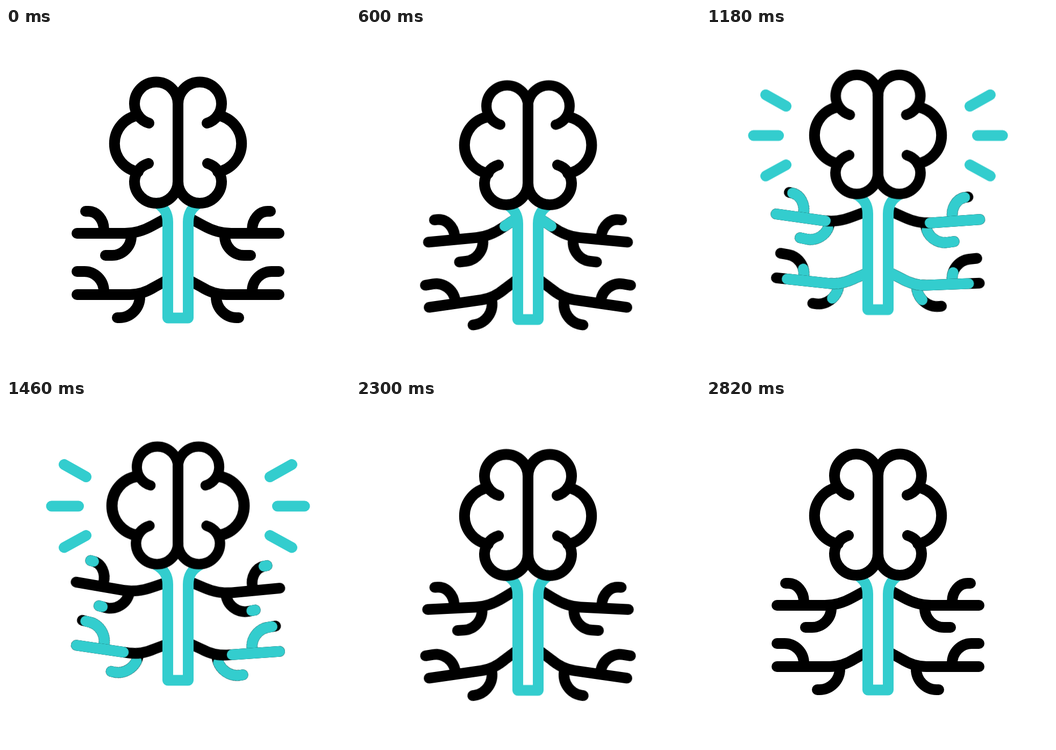
Write an HTML page without scripts that moves like this. It is 640x640 px and loops after 3.2 s.

```html
<!DOCTYPE html>
<html lang="en">
<head>
<meta charset="utf-8">
<title>Nervous system</title>
<style>
  html, body { margin: 0; width: 100%; height: 100%; overflow: hidden; background: #fff; }
  svg { display: block; width: 100%; height: 100%; --teal: #33cdce; }
  path { fill: none; stroke: #000; stroke-width: 20; stroke-linecap: round; stroke-linejoin: round; }
  g, path { animation: 3200ms linear infinite both; }
  .stem, .pulse, .ray { stroke: var(--teal); }
  .stem { stroke-linecap: butt; }

  .left { --lag: 0deg; }
  .right { --lag: 4.4deg; }

  .body { animation-name: bob; }
  .upper { animation-name: swing-upper; transform-origin: 278px 360px; }
  .lower { animation-name: swing-lower; transform-origin: 280px 478px; }
  .up, .down { animation-name: bend; }
  .upper .up { transform-origin: 182px 380px; }
  .upper .down { transform-origin: 233px 384px; }
  .lower .up { transform-origin: 182px 494px; }
  .lower .down { transform-origin: 249px 497px; }

  .upper .limb { d: path("M297 354.5 L272 368 Q247 382 221 382 H132"); }
  .upper .up path { d: path("M182 375 A29 34 0 0 0 153 341 H148"); }
  .upper .down path { d: path("M233 387 A36 36 0 0 1 197 423 H185"); }
  .lower .limb { d: path("M297 470.5 L276 482 Q254 496 230 496 H132"); }
  .lower .up path { d: path("M182 490 A36 37 0 0 0 146 453 H132"); }
  .lower .down path { d: path("M249 500 A38 39 0 0 1 211 539 H207"); }

  .limb.pulse { animation-name: pulse-limb; }
  .up .pulse { animation-name: pulse-up; }
  .down .pulse { animation-name: pulse-down; }
  .lower .pulse { animation-delay: 270ms; }
  .ray { animation-name: ray; }

  .lobe { animation-name: throb; animation-timing-function: ease-in-out; }
  .top { --size: .93; transform-origin: 320px 177px; }
  .side { --size: 1.042; transform-origin: 320px 215px; animation-delay: 150ms; }
  .base { --size: .93; transform-origin: 320px 252px; animation-delay: 260ms; }

  @keyframes bob {
    0%, 6.6% { transform: translateY(0); animation-timing-function: ease-in-out; }
    11.7% { transform: translateY(7px); animation-timing-function: ease-in; }
    28.75% { transform: translateY(-11px); animation-timing-function: ease-out; }
    33.1% { transform: translateY(-14.5px); animation-timing-function: cubic-bezier(.3, .3, .6, 1); }
    56.25% { transform: translateY(-19.5px); animation-timing-function: cubic-bezier(.5, 0, .7, 1); }
    69.4% { transform: translateY(7px); animation-timing-function: ease-out; }
    76.25% { transform: translateY(-5px); animation-timing-function: ease-in-out; }
    88.1%, 100% { transform: translateY(0); }
  }
  @keyframes swing-upper {
    0%, 6.6% { transform: rotate(0deg); animation-timing-function: ease-in-out; }
    12.5% { transform: rotate(-9deg); }
    18.75% { transform: rotate(-5.4deg); }
    28.75% { transform: rotate(calc(4.3deg - var(--lag) * .68)); animation-timing-function: ease-out; }
    45.6% { transform: rotate(calc(9.8deg - var(--lag))); }
    54% { transform: rotate(calc(9.8deg - var(--lag))); animation-timing-function: ease-in; }
    61.9% { transform: rotate(calc(8.2deg - var(--lag))); animation-timing-function: ease-in-out; }
    69.1% { transform: rotate(-8deg); }
    71.9% { transform: rotate(-2.8deg); animation-timing-function: ease-out; }
    76.25% { transform: rotate(4deg); animation-timing-function: ease-in-out; }
    88.1%, 100% { transform: rotate(0deg); }
  }
  @keyframes swing-lower {
    0%, 6.6% { transform: rotate(0deg); animation-timing-function: ease-in-out; }
    13.1% { transform: rotate(-17deg); animation-timing-function: ease-in-out; }
    18.75% { transform: rotate(-8.2deg); }
    28.75% { transform: rotate(calc(1.5deg - var(--lag) * .6)); animation-timing-function: ease-out; }
    45.6% { transform: rotate(calc(8.3deg - var(--lag))); }
    54% { transform: rotate(calc(9.8deg - var(--lag))); }
    61.9% { transform: rotate(calc(9.4deg - var(--lag))); animation-timing-function: ease-in-out; }
    69.7% { transform: rotate(-14deg); }
    71.9% { transform: rotate(-8.2deg); animation-timing-function: ease-out; }
    77.2% { transform: rotate(4deg); animation-timing-function: ease-in-out; }
    88.1%, 100% { transform: rotate(0deg); }
  }
  @keyframes bend {
    0%, 6.6% { transform: rotate(0deg); }
    13.1% { transform: rotate(-2.5deg); }
    18.75% { transform: rotate(-1.5deg); }
    28.75% { transform: rotate(2.5deg); }
    45.6%, 61.9% { transform: rotate(5.5deg); }
    71.9% { transform: rotate(-1deg); }
    76.5% { transform: rotate(1deg); }
    88.1%, 100% { transform: rotate(0deg); }
  }
  @keyframes throb {
    0%, 13.1%, 32.7%, 52.2%, 100% { transform: scale(1); }
    22.9%, 42.4% { transform: scale(var(--size)); }
  }

  /* Each pulse grows from the root, then its tail catches up at the tip. */
  @keyframes pulse-limb {
    0%, 17% { opacity: 0; stroke-dasharray: 0 2; stroke-dashoffset: 0; }
    17.01% { opacity: 1; stroke-dasharray: 0 2; }
    30%, 30.9% { stroke-dasharray: 1 2; stroke-dashoffset: 0; }
    44% { opacity: 1; stroke-dasharray: 0 2; stroke-dashoffset: -1; }
    44.01%, 100% { opacity: 0; stroke-dasharray: 0 2; stroke-dashoffset: -1; }
  }
  @keyframes pulse-up {
    0%, 25.6% { opacity: 0; stroke-dasharray: 0 2; stroke-dashoffset: 0; }
    25.61% { opacity: 1; stroke-dasharray: 0 2; }
    38.4% { stroke-dasharray: 1 2; stroke-dashoffset: 0; }
    46.5% { opacity: 1; stroke-dasharray: 0 2; stroke-dashoffset: -1; }
    46.51%, 100% { opacity: 0; stroke-dasharray: 0 2; stroke-dashoffset: -1; }
  }
  @keyframes pulse-down {
    0%, 24.7% { opacity: 0; stroke-dasharray: 0 2; stroke-dashoffset: 0; }
    24.71% { opacity: 1; stroke-dasharray: 0 2; }
    34.4%, 35.6% { stroke-dasharray: 1 2; stroke-dashoffset: 0; }
    46.7% { opacity: 1; stroke-dasharray: 0 2; stroke-dashoffset: -1; }
    46.71%, 100% { opacity: 0; stroke-dasharray: 0 2; stroke-dashoffset: -1; }
  }
  @keyframes ray {
    0%, 22.5% { opacity: 0; stroke-dasharray: 0 2; stroke-dashoffset: 0; }
    22.51% { opacity: 1; stroke-dasharray: 0 2; stroke-dashoffset: 0; animation-timing-function: cubic-bezier(.215, .61, .355, 1); }
    46.9% { opacity: 1; stroke-dasharray: 1 2; stroke-dashoffset: 0; }
    51.25% { opacity: 1; stroke-dasharray: 1 2; stroke-dashoffset: 0; animation-timing-function: ease-in; }
    61.2% { opacity: 1; stroke-dasharray: 0 2; stroke-dashoffset: -1; }
    61.21%, 100% { opacity: 0; stroke-dasharray: 0 2; stroke-dashoffset: -1; }
  }
</style>
</head>
<body>
<svg viewBox="0 0 640 640">
  <g class="body">
    <g class="left">
      <path class="ray" pathLength="1" d="M149 161 L108 138"/>
      <path class="ray" pathLength="1" d="M135 215.5 H84.5"/>
      <path class="ray" pathLength="1" d="M149 270 L108 292.5"/>
      <g class="upper">
        <g class="up"><path/><path class="pulse" pathLength="1"/></g>
        <g class="down"><path/><path class="pulse" pathLength="1"/></g>
        <path class="limb"/><path class="limb pulse" pathLength="1"/>
      </g>
      <g class="lower">
        <g class="up"><path/><path class="pulse" pathLength="1"/></g>
        <g class="down"><path/><path class="pulse" pathLength="1"/></g>
        <path class="limb"/><path class="limb pulse" pathLength="1"/>
      </g>
    </g>
    <g class="right" transform="translate(640) scale(-1 1)">
      <path class="ray" pathLength="1" d="M149 161 L108 138"/>
      <path class="ray" pathLength="1" d="M135 215.5 H84.5"/>
      <path class="ray" pathLength="1" d="M149 270 L108 292.5"/>
      <g class="upper">
        <g class="up"><path/><path class="pulse" pathLength="1"/></g>
        <g class="down"><path/><path class="pulse" pathLength="1"/></g>
        <path class="limb"/><path class="limb pulse" pathLength="1"/>
      </g>
      <g class="lower">
        <g class="up"><path/><path class="pulse" pathLength="1"/></g>
        <g class="down"><path/><path class="pulse" pathLength="1"/></g>
        <path class="limb"/><path class="limb pulse" pathLength="1"/>
      </g>
    </g>

    <path class="stem" d="M278 324 C294 333 301 344 301 361 V539.5 H339 V361 C339 344 346 333 362 324"/>

    <path class="lobe side" d="M246 162.4 A53.4 53.4 0 0 0 246 267.6 M394 162.4 A53.4 53.4 0 0 1 394 267.6"/>
    <path class="lobe top" d="M266 177 A38 38 0 0 1 239 141 A40.5 40.5 0 0 1 320 141 A40.5 40.5 0 0 1 401 141 A38 38 0 0 1 374 177"/>
    <path class="lobe base" d="M265 252 A36 36 0 0 0 239 285.5 A40.5 40.5 0 0 0 320 285.5 A40.5 40.5 0 0 0 401 285.5 A36 36 0 0 0 375 252"/>
    <path d="M320 141 V285"/>
  </g>
</svg>
</body>
</html>
```
